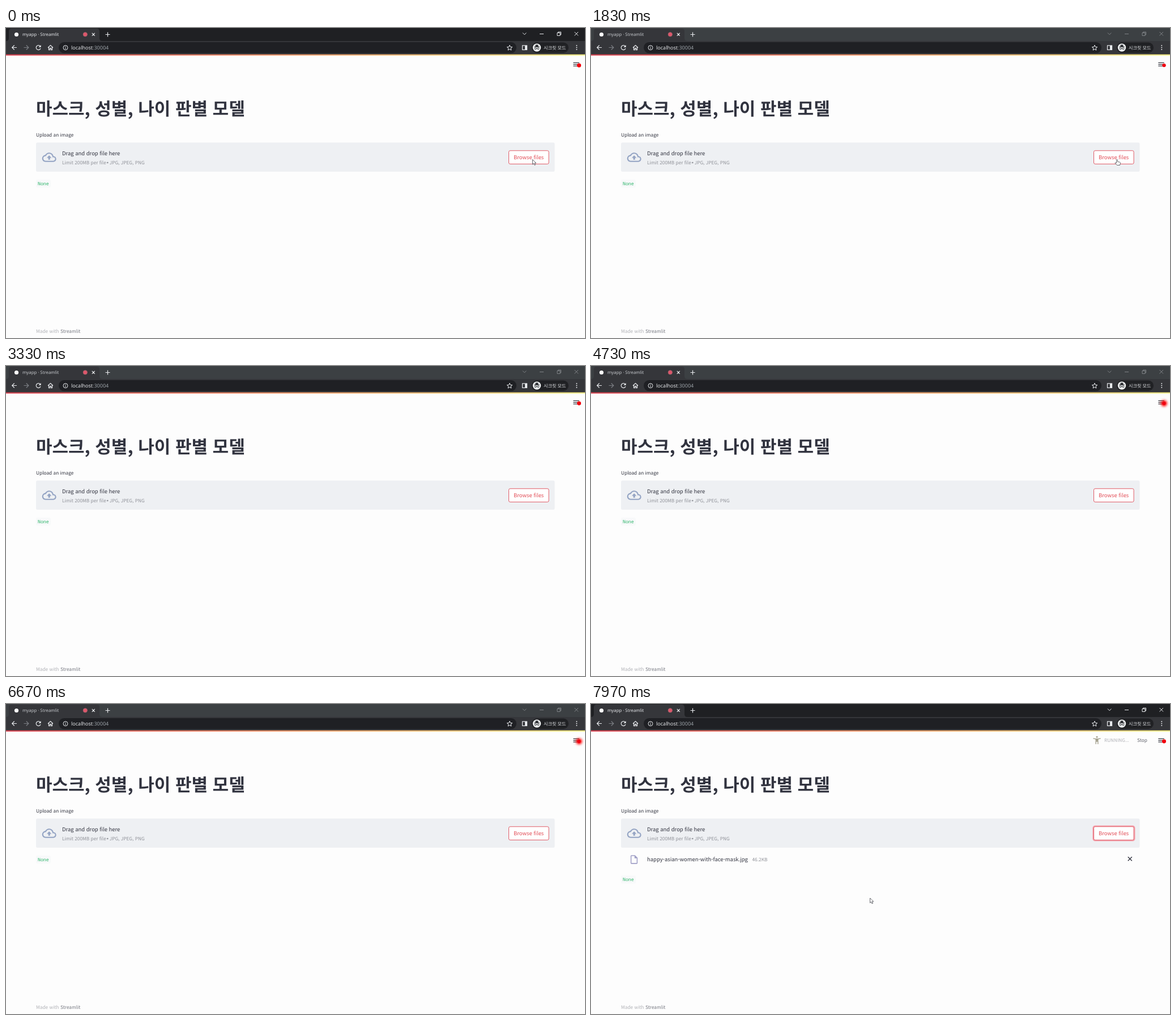
These frames come from a looping animation (1022x548 px, 8000 ms). An HTML page:

```html
<!DOCTYPE html>
<html lang="ko">
<head>
<meta charset="utf-8">
<title>myapp</title>
<style>
  html, body { margin: 0; width: 100%; height: 100%; overflow: hidden; background: #fdfdfd; }
  svg { display: block; width: 1022px; height: 548px; }
  text { font: 8.3px "Noto Sans CJK KR", "Noto Sans CJK JP", "Noto Sans CJK", sans-serif; text-rendering: geometricPrecision; fill: #31333f; }
  .body { font-size: 9.45px; }
  .ui { font: 7.8px "Noto Sans", "Open Sans", sans-serif; fill: #e4e6e9; }
  .code { font: 8.2px "Noto Sans Mono", monospace; fill: #2fb56b; }
  .soft { fill: #8f9198; }
  .pale { fill: #b0b1b6; }
  .line { fill: none; stroke: #e8eaed; stroke-width: 1.2; }
  #frame { fill: #1f2023; }
  #controls { stroke-width: 1; }
  .inactive #frame { fill: #3c4043; }
  .inactive #controls { stroke: #7f8286; }
  .inactive #title { fill: #c3c6ca; }
</style>
</head>
<body>
<svg id="stage" viewBox="0 0 1022 548">
  <defs>
    <linearGradient id="strip">
      <stop offset="0" stop-color="#d8404f"/>
      <stop offset=".5" stop-color="#f29a68"/>
      <stop offset="1" stop-color="#f7ee86"/>
    </linearGradient>
    <filter id="blur" x="-200%" y="-200%" width="500%" height="500%">
      <feGaussianBlur id="blurSize" stdDeviation="0"/>
    </filter>
  </defs>

  <!-- browser window -->
  <rect id="frame" width="1022" height="24"/>
  <path d="M0 23Q5 23 5 18V6Q5 1 10 1H160Q165 1 165 6V18Q165 23 170 23H1022V47H0Z" fill="#35363a"/>
  <circle cx="18.5" cy="11.5" r="3.6" fill="#fff"/>
  <text id="title" class="ui" x="29" y="14">myapp · Streamlit</text>
  <circle cx="139.8" cy="11.3" r="3.6" fill="#e0566a" stroke="#a9606c" stroke-width="1"/>
  <path class="line" d="M151.8 8.8l5 5m0-5l-5 5M175.5 11.5h8m-4-4v8"/>
  <path id="controls" class="line" d="M912 8.5l3.2 3.2 3.2-3.2M942 10.5h7M973 8.5h5v5h-5zM974.5 8.5V7h5v5h-1.5M1003.5 7l6.5 6.5m0-6.5l-6.5 6.5"/>

  <path class="line" d="M19 34.5h-8.3m4-4l-4 4 4 4"/>
  <path class="line" style="stroke:#7c7f84" d="M31.5 34.5h8.3m-4-4l4 4-4 4"/>
  <path class="line" d="M60.4 32.2A4 4 0 1 0 61 36"/>
  <path d="M61.6 30v4h-4z" fill="#e8eaed"/>
  <path class="line" d="M74 34.8l4.5-4.3 4.5 4.3M75.5 34v4.6h2v-3h2v3h2V34"/>
  <rect x="93" y="25" width="808" height="19.5" rx="9.7" fill="#1f2024"/>
  <circle class="line" cx="105" cy="34.8" r="4" style="stroke-width:1"/>
  <path class="line" style="stroke-width:1" d="M105 34.3v2.8M105 32.3v1"/>
  <text class="ui" x="115" y="38" style="font-size:9px">localhost<tspan fill="#9aa0a6">:30004</tspan></text>
  <path class="line" style="stroke-width:1" d="M889 30.3l1.3 3.1 3.4.3-2.6 2.2.8 3.3-2.9-1.8-2.9 1.8.8-3.3-2.6-2.2 3.4-.3z"/>
  <rect class="line" x="911.5" y="31" width="8" height="7.5"/>
  <path d="M916 31h4v7.5h-4z" fill="#e8eaed"/>
  <rect x="928" y="25.5" width="65" height="18.5" rx="9.2" fill="#202124"/>
  <circle cx="937" cy="34.6" r="7.2" fill="#f1f3f4"/>
  <path d="M934 33l.9-3.5h4.2L940 33h2v.9h-10V33z" fill="#303236"/>
  <path d="M933 36.5a1.5 1.5 0 1 0 3 0a1.5 1.5 0 1 0-3 0M938 36.5a1.5 1.5 0 1 0 3 0a1.5 1.5 0 1 0-3 0M936 36.2h2" fill="none" stroke="#303236"/>
  <text x="949" y="37.6" style="font-size:8.1px;fill:#e8eaed">시크릿 모드</text>
  <path d="M1007.3 31v.01m0 3.5v.01m0 3.5v.01" stroke="#e8eaed" stroke-width="1.9" stroke-linecap="round"/>

  <!-- page -->
  <rect y="46.6" width="1022" height="2.1" fill="url(#strip)"/>
  <path d="M1001.3 61.4h10.5m-10.5 2.9h10.5m-10.5 2.9h10.5" stroke="#3b3d46" stroke-width="1.2"/>
  <circle id="glow" cx="1011.5" cy="66" r="3" fill="#f00" filter="url(#blur)"/>
  <circle cx="1011.5" cy="66" r="3" fill="#f00010"/>

  <g id="status">
    <circle cx="893" cy="58.2" r="1.5" fill="#a5a18f"/>
    <path d="M886.5 60.2l4.5.9h4l4.5-.9.3 1.2-4.3 1.1v8.5h-1.4v-4.2h-2.2V71h-1.4v-8.5l-4.3-1.1z" fill="#a5a18f"/>
    <text class="pale" x="906" y="67" style="font-size:8.2px">RUNNING...</text>
    <text x="964" y="67" fill-opacity=".75">Stop</text>
  </g>

  <text x="53" y="154" style="font-size:31px;font-weight:700">마스크, 성별, 나이 판별 모델</text>
  <text x="53" y="192">Upload an image</text>
  <rect x="53" y="202.5" width="915.5" height="51.5" rx="2.5" fill="#eef0f3"/>
  <path transform="translate(63.7 216) scale(1.04)" fill="#93a3c3" d="M19.35 10.04A7.49 7.49 0 0 0 12 4C9.11 4 6.6 5.64 5.35 8.04A6 6 0 0 0 0 14c0 3.31 2.69 6 6 6h13c2.76 0 5-2.24 5-5 0-2.64-2.05-4.78-4.65-4.96zM19 18H6c-2.21 0-4-1.79-4-4 0-2.05 1.53-3.76 3.56-3.97l1.07-.11.5-.95A5.47 5.47 0 0 1 12 6c2.62 0 4.88 1.86 5.39 4.43l.3 1.5 1.53.11A2.98 2.98 0 0 1 22 15c0 1.65-1.35 3-3 3zM8 13h2.55v3h2.9v-3H16l-4-4z"/>
  <text class="body" x="99" y="225">Drag and drop file here</text>
  <text class="soft" x="99" y="241">Limit 200MB per file</text>
  <circle cx="179.3" cy="238" r="1.3" fill="#8f9198"/>
  <text class="soft" x="182.7" y="241">JPG, JPEG, PNG</text>
  <rect id="ring" x="886.4" y="215.8" width="73" height="25.6" rx="3.4" fill="none" stroke="#f4a0aa" stroke-width="2.2"/>
  <rect x="887.5" y="216.8" width="70.6" height="23.6" rx="2.4" fill="#fff" stroke="#df5a66"/>
  <text class="body" x="896" y="232" style="fill:#e24b55">Browse files</text>

  <g id="file">
    <path transform="translate(66.8 265.7) scale(.77)" fill="#a09fc6" d="M14 2H6a2 2 0 0 0-2 2v16a2 2 0 0 0 2 2h12a2 2 0 0 0 2-2V8zM6 20V4h7v5h5v11z"/>
    <text class="body" x="99" y="278">happy-asian-women-with-face-mask.jpg</text>
    <text class="soft" x="284.5" y="278">46.2KB</text>
    <path d="M947.8 270.2l7 7m0-7l-7 7" stroke="#31333f" stroke-width="1.3"/>
  </g>
  <g id="none">
    <rect x="53" y="268" width="26" height="14" rx="2" fill="#f8f9fa"/>
    <text class="code" x="56" y="278">None</text>
  </g>
  <text class="pale" x="53" y="539">Made with <tspan fill="#777982">Streamlit</tspan></text>

  <g fill="#fff" stroke="#44464d" stroke-width=".8" stroke-linejoin="round">
    <path id="arrow" d="M0 0v8.6l2-1.8 1.5 3.2 1.5-.7-1.4-3.1h2.6z"/>
    <path id="hand" d="M-1 1Q0-.6 1 1V4.4L5 5.2Q6 5.5 6 6.6L5 10.5H0L-3.6 6.6Q-3.6 5-1 6.6Z"/>
  </g>
</svg>
<script>
const LOOP = 8000, PULSE = 2000, PULSE_START = 1820;
const el = id => document.getElementById(id);
const show = (id, on) => { el(id).style.opacity = +on; };
const place = (id, x, y) => el(id).setAttribute("transform", `translate(${x} ${y})`);
const ramp = (t, from, to) => Math.min(1, Math.max(0, (t - from) / (to - from)));

// The CSS "ease" curve, cubic-bezier(.25, .1, .25, 1)
function ease(x) {
  const bez = (a, b, s) => 3 * a * s * (1 - s) ** 2 + 3 * b * s * s * (1 - s) + s ** 3;
  let lo = 0, hi = 1;
  for (let i = 0; i < 20; i++) {
    const mid = (lo + hi) / 2;
    if (bez(.25, .25, mid) < x) lo = mid; else hi = mid;
  }
  return bez(.1, 1, lo);
}

function draw(t) {
  const phase = ((t - PULSE_START + PULSE) % PULSE) / PULSE * 2;
  const glow = phase < 1 ? ease(phase) : 1 - ease(phase - 1);
  el("blurSize").setAttribute("stdDeviation", 2.3 * glow);
  el("glow").setAttribute("r", 3 + 2.4 * glow);

  const active = t < 1300 || t >= 7000;
  el("stage").setAttribute("class", active ? "" : "inactive");
  show("ring", active && t >= 900);

  // Pointer: hover, click, leave for the file dialog, come back
  show("hand", t >= 60 && t < 2050);
  place("hand", 928.5 - 8 * ramp(t, 1900, 2050), 232);
  show("arrow", t < 60 || t >= 7000);
  if (t < 60) place("arrow", 929.5, 232.5);
  else place("arrow", 492.5, 402 - 59 * ease(ramp(t, 7050, 7480)));

  const uploaded = t >= 7560;
  show("file", uploaded);
  place("none", 0, uploaded ? 35.3 : 0);
  show("status", ramp(t, 7650, 7850));
}

const start = performance.now();
function tick() {
  draw((performance.now() - start) % LOOP);
  requestAnimationFrame(tick);
}
tick();
</script>
</body>
</html>
```
